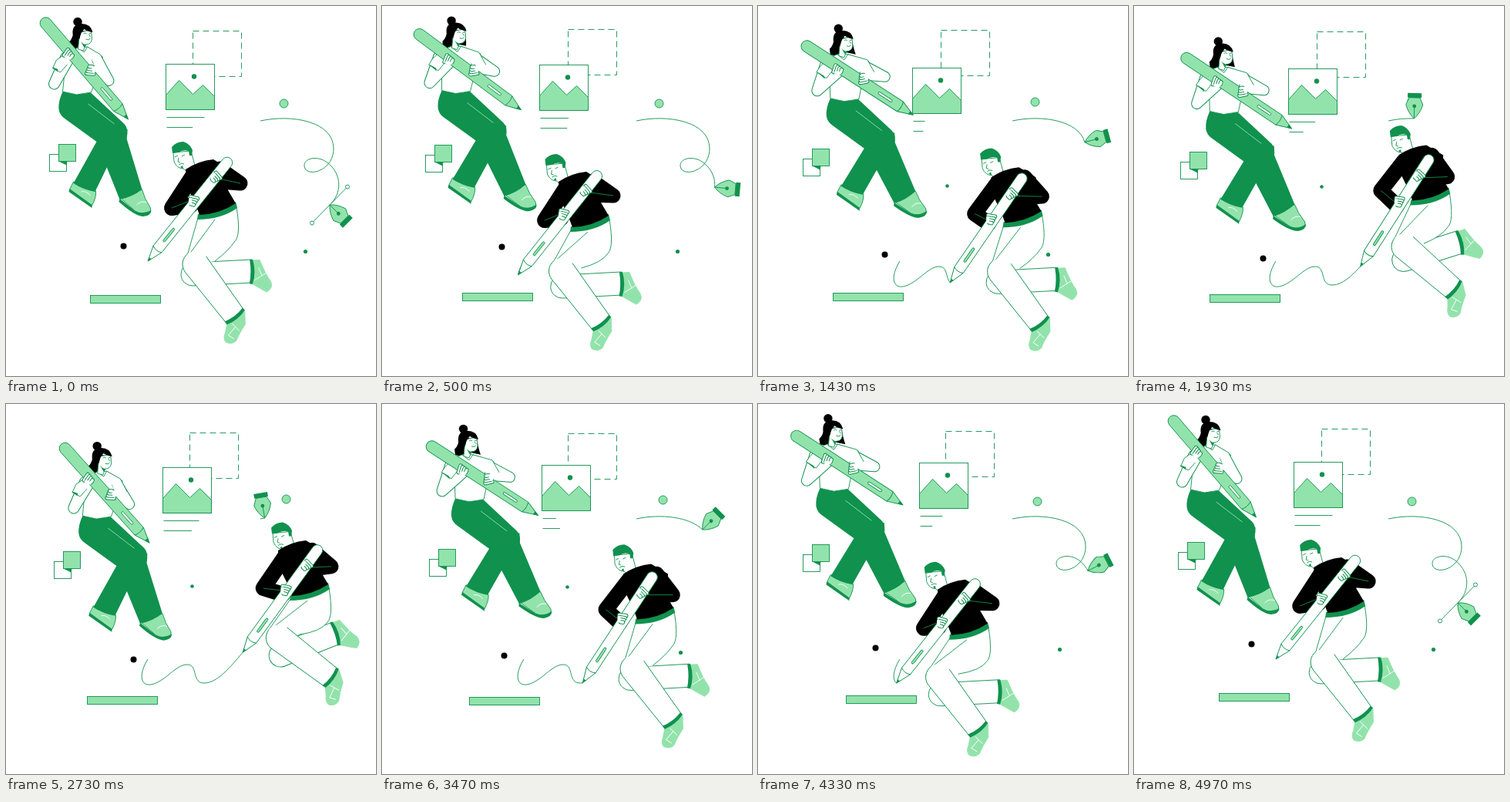
An HTML page with a canvas that plays this animation: 480x480 px, repeating every 5 s.

```html
<!DOCTYPE html>
<html lang="en">
<head>
<meta charset="utf-8">
<title>Design team</title>
<style>
html, body { margin: 0; height: 100%; overflow: hidden; background: #fff; }
canvas { display: block; }
</style>
</head>
<body>
<canvas id="stage" width="480" height="480"></canvas>
<script>
const c = document.getElementById('stage').getContext('2d');
const DARK = '#10914e', LIGHT = '#92e3ab', WHITE = '#fff', BLACK = '#000';
const LOOP = 5000, HALF = LOOP / 2;
const { PI, cos, sin, exp, abs, round } = Math;

const clamp = v => Math.max(0, Math.min(1, v));
const smooth = v => { v = clamp(v); return v * v * (3 - 2 * v); };

function draw(d, fill, edge) {
  const p = new Path2D(d);
  if (fill) { c.fillStyle = fill; c.fill(p); }
  if (edge) { c.strokeStyle = edge; c.stroke(p); }
}

function group(x, y, deg, paint) {
  c.save();
  c.translate(x, y);
  c.rotate(deg * PI / 180);
  paint();
  c.restore();
}

function dot(x, y, r, fill, edge) {
  c.beginPath();
  c.arc(x, y, r, 0, 7);
  c.fillStyle = fill;
  c.fill();
  if (edge) { c.strokeStyle = edge; c.stroke(); }
}

function box(x, y, w, h, fill, edge) {
  c.fillStyle = fill;
  c.fillRect(x, y, w, h);
  c.strokeStyle = edge;
  c.strokeRect(x, y, w, h);
}

function limb(points, width, fill, edge) {
  c.save();
  c.lineCap = c.lineJoin = 'round';
  const p = new Path2D('M' + points.join('L'));
  if (edge) { c.lineWidth = width + 1; c.strokeStyle = edge; c.stroke(p); }
  c.lineWidth = width - 1;
  c.strokeStyle = fill;
  c.stroke(p);
  c.restore();
}

function hand(x, y, deg) {
  group(x, y, deg, () => {
    for (let i = 0; i < 4; i++) limb([[-4 + i, i * 3 - 5], [5 - i, i * 3 - 5]], 4.5, WHITE, DARK);
    limb([[-4, -2], [-3, 3]], 5, WHITE);
  });
}

// A curve that can be drawn partway and followed
function curve(d) {
  const el = document.createElementNS('http://www.w3.org/2000/svg', 'path');
  el.setAttribute('d', d);
  const total = el.getTotalLength();
  return {
    at(part) {
      const p = el.getPointAtLength(total * clamp(part));
      return [p.x, p.y];
    },
    heading(part) {
      const [ax, ay] = this.at(part - .01), [bx, by] = this.at(part + .01);
      return Math.atan2(by - ay, bx - ax) * 180 / PI;
    },
    trace(part) {
      c.setLineDash([total * part, total]);
      if (part > .001) draw(d, null, DARK);
      c.setLineDash([]);
    }
  };
}
const wave = curve('M184 331C172 350 174 366 188 364C206 361 220 338 235 338C250 338 240 363 258 362C278 361 297 333 317 311');
const curl = curve('M330 149C372 140 425 150 425 185C425 212 395 222 388 211C382 198 404 192 418 204C436 219 436 243 420 258');

function props(turn) {
  // Slow elliptic float: centre, reach and phase for each axis
  const float = (x, rx, px, y, ry, py) =>
    [round(x + rx * cos(turn + px)) + .5, round(y + ry * cos(turn + py)) + .5];

  c.setLineDash([8, 5]);
  box(...float(240, 3.2, .7, 34, 4, -4.2), 63, 59, WHITE, DARK);
  c.setLineDash([]);

  const [x, y] = float(204.5, 4.5, 1, 78.5, 3.4, 3.3);
  box(x, y, 63, 59, WHITE, DARK);
  group(x, y, 0, () => {
    draw('M0 40L17 21L35 39L48 27L63 42V59H0Z', LIGHT, DARK);
    dot(36.5, 16, 3.2, DARK);
    draw(`M1 69h${31 + 18 * cos(2 * turn)}M1 82h${24.5 + 12 * cos(2 * turn - .7)}`, null, DARK);
  });

  const [sx, sy] = float(71, 3, -3.7, 185, 6, -3.3);
  box(sx - 12, sy + 13, 22, 22, WHITE, DARK);
  draw(`M${sx} ${sy + 22}h11l-1 5Z`, DARK);
  box(sx, sy, 22, 22, LIGHT, DARK);

  box(...float(106, 9, -5.1, 376, 4.5, -4.4), 91, 10, LIGHT, DARK);
  dot(...float(159, 8, -2.7, 321, 10, -3.3), 4, BLACK);
  dot(...float(243, 3, -1, 235, 2, -4.5), 2.3, DARK);
  dot(...float(383, 8, -5.4, 321, 3.5, -3), 2.6, DARK);
  dot(...float(361, 2.7, -4.3, 124.5, 1.5, 0), 5.5, LIGHT, DARK);
}

function nib(phase, ease) {
  const part = 1 - ease, tip = curl.at(part);
  curl.trace(part);
  const grow = clamp((.16 - phase) * 10);
  if (grow) {
    const dx = 23 * grow, dy = 23.5 * grow;
    draw(`M${420 - dx} ${258 + dy}L${420 + dx} ${258 - dy}`, null, DARK);
    for (const s of [-1, 1]) dot(420 + s * dx, 258 - s * dy, 2.5, WHITE, DARK);
  }
  group(...tip, curl.heading(part) - 90, () => {
    draw('M0 0Q7 -8 18 -11L27 -7V7L18 11Q7 8 0 0Z', LIGHT, DARK);
    draw('M0 0H15', null, DARK);
    dot(16, 0, 2.4, DARK);
    draw('M27 -9H33V9H27Z', DARK);
  });
}

function woman(turn) {
  const x = 88.8 - 13 * cos(turn) - 2.3 * cos(2 * turn);
  const y = 122 - 18 * cos(turn) + 7 * cos(2 * turn);
  const k = smooth(2 * sin(turn) ** 2);          // 0 upright, 1 leaning back
  const pt = (ax, ay, bx, by) => [ax + (bx - ax) * k, ay + (by - ay) * k];

  group(x - 74, y - 111, 0, () => {
    // legs
    group(0, -5 * k, 0, () => {
      draw('M88 228L117 240Q118 248 112 259L83 238Z', LIGHT, DARK);
      draw('M83 237L112 258V262L82 241Z', DARK);
      draw('M98 241Q104 239 110 246', null, WHITE);
    });
    draw(`M74 111Q68 124 69 134Q70 142 78 147L118 176L88 ${230 - 5 * k}Q100 ${238 - 5 * k} 116 ${241 - 5 * k}L133 206L157 172Q160 159 154 153L110 112Q92 117 74 111Z`, DARK);
    group(146, 165 - 3 * k, -6 * k, () => {
      c.translate(-146, -165);
      draw('M149 249L177 238Q180 250 188 262V267Q177 272 168 266Z', LIGHT, DARK);
      draw('M148 250L168 266Q178 271 189 265Q189 272 178 273Q167 272 147 254Z', DARK);
      draw('M170 258Q176 252 183 255', null, WHITE);
      draw('M118 176L148 251Q164 248 177 238L157 172L158 160L140 158Z', DARK);
    });
    draw('M107 127L141 153', null, LIGHT);

    // torso and head
    const shift = -9 * k;
    group(shift, 0, 0, () => {
      draw(`M88 30Q88 42 82 47L${pt(78, 56, 83, 54)}Q92 58 97 50L${pt(100, 50, 116, 54)}Q113 46 111 34Z`, BLACK);
    });
    const leftNeck = pt(94, 54, 83, 54), rightNeck = pt(106, 53, 97, 54);
    draw('M' + [leftNeck, pt(82, 60, 68, 60), pt(77, 82, 73, 82), [74, 111], [92, 115], [111, 112],
      pt(120, 88, 116, 88), pt(126, 66, 124, 63), rightNeck].join('L') + 'Z', WHITE, DARK);
    draw(`M${leftNeck}L${pt(102, 60, 92, 61)}L${rightNeck}`, null, DARK);
    group(shift, 0, 0, () => {
      draw('M97 34L95 45L94 56L101 58L104 50Q111 50 112 43L111 31Z', WHITE, DARK);
      draw('M97 45Q100 50 105 50L102 54Z', DARK);
      draw('M87 36Q86 23 99 23Q110 23 113 34Q106 33 102 30Q98 33 96 42L90 46Z', BLACK);
      dot(93.5, 20.5, 5.7, BLACK);
      draw('M101 36Q103 34 105 36M108 36L111 35M104 43Q108 45 110 42M108 37L110 40', null, DARK);
    });

    // arms and pencil
    limb([pt(78, 67, 68, 67), pt(63, 101, 57, 101), pt(81, 70, 84, 77)], 14, WHITE, DARK);
    limb([pt(119, 70, 117, 68), pt(134, 97, 145, 83), pt(113, 84, 118, 81)], 13, WHITE, DARK);
    draw('M' + [pt(84, 58, 72, 57), pt(66, 70, 60, 71), pt(61, 81, 56, 77), pt(71, 86, 69, 85), pt(80, 76, 76, 76)].join('L'), WHITE, DARK);
    draw('M' + [pt(60, 79, 56, 76), pt(68, 82, 66, 82), pt(67, 85, 67, 86)].join('L') + 'Z', DARK);
    draw('M' + [rightNeck, pt(123, 63, 122, 61), pt(132, 80, 131, 77), pt(118, 85, 117, 82)].join('L'), WHITE);
    draw('M' + [rightNeck, pt(123, 63, 122, 61), pt(132, 80, 131, 77)].join('L'), null, DARK);
    group(105.5 + 7 * k, 84.5 + 3.5 * k, 49.4 - 16.5 * k, () => {
      draw('M-82 -7.5H62L82 0L62 7.5H-82A7.5 7.5 0 0 1 -82 -7.5Z', LIGHT, DARK);
      draw('M62 -7.5Q65 0 62 7.5', null, DARK);
      draw('M76 -2.5L83 0L76 2.5Z', DARK);
      draw('M30 -1.5H48A1.5 1.5 0 0 1 48 1.5H30A1.5 1.5 0 0 1 30 -1.5Z', WHITE, DARK);
      hand(-31, 4, -105);
      hand(2, -5, 135);
    });
  });
}

function man(phase, ease) {
  const part = .95 * ease;
  wave.trace(part);
  const [tx, ty] = wave.at(part);
  const bend = exp(-(((phase - .7) / .17) ** 2));   // elbows lift late in the stroke
  const fold = smooth((phase - .6) / .25);          // legs swing up near the end
  const kick = cos(10 * phase);
  const ox = -64 + 6 * phase - 8 * sin(PI * phase), oy = 55 + 22 * bend + 9 * phase;
  const pen = 38.8 - 6 * bend - 1.5 * phase;
  const shin = 52.8 - 15.5 * fold, calf = -3 - 19 * fold;
  const knee = [241 + 6 * kick, 329 + 5 * kick];
  const mix = (ax, ay, bx, by) => [ax + (bx - ax) * bend, ay + (by - ay) * bend];
  const a = pen * PI / 180, b = shin * PI / 180;
  const onPen = d => [249 + ox + d * sin(a), 275 + oy - d * cos(a)];

  group(tx - ox - 249, ty - oy - 275, 0, () => {
    // back leg
    group(240 + 3 * kick, 347, calf, () => {
      draw('M78 -14L88 -14Q94 4 101 15Q104 23 95 28Q88 24 76 16Z', LIGHT, LIGHT);
      draw('M80 12L96 3M90 7L86 -4', null, WHITE);
      draw('M0 -15H78L75 15H0A15 15 0 0 1 0 -15Z', WHITE, DARK);
      draw('M75 -15H79Q83 2 77 17L73 16Q77 2 75 -15Z', DARK);
    });
    // thighs
    const top = [knee[0] - 17 * cos(b), knee[1] - 17 * sin(b)];
    const inner = [knee[0] + 25, knee[1] - 4];
    const seat = `300 260Q306 296 298 304Q290 316 ${inner}`;
    draw(`M${top}L250 274L${seat}L${knee}Z`, WHITE);
    draw(`M250 274L${top}M${seat}`, null, DARK);
    draw(`M272 276L${[top[0] + 4, top[1] - 2]}`, null, DARK);
    // front shin
    group(...knee, shin, () => {
      draw('M86 14L87 -14L101 -4Q106 10 111 18Q112 26 104 30Q98 30 94 23Z', LIGHT, LIGHT);
      draw('M90 9L103 7M96 8L99 22L107 19', null, WHITE);
      draw('M85 -14L0 -17A17 17 0 0 0 0 17L85 14.5Z', WHITE);
      draw('M85 -14L0 -17M85 14.5L0 17A17 17 0 0 1 -17 0', null, DARK);
      draw('M82 -14L86 -15Q91 0 87 15L82 15Q86 0 82 -14Z', DARK);
    });

    // head
    group(11 * phase * phase, -3 * bend, 0, () => {
      draw('M218 189L219 201Q223 210 231 210L236 214L246 206L241 187Z', WHITE, DARK);
      draw('M217 190L216 182Q222 175 231 175Q240 178 243 186L242 193L239 193L238 187Q230 185 225 189Z', DARK);
      draw('M220 195L224 193M229 194L233 192M225 196L224 201L227 202M225 205Q229 202 232 204', null, DARK);
      draw('M227 208L230 206L231 210Z', DARK);
    });

    // sweater
    draw('M250 269Q276 268 299 253L301 261Q280 276 249 276Z', DARK);
    draw('M234 211Q250 200 270 198L292 211L289 238L299 255Q278 269 252 270L246 254L236 234Z', BLACK);
    const leftElbow = mix(216, 261, 210, 256), rightElbow = mix(305, 229, 296, 241);
    const low = onPen(97), high = onPen(139);
    limb([mix(244, 218, 240, 219), leftElbow, [low[0] - 5, low[1] + 3]], 21, BLACK);
    limb([mix(278, 210, 277, 211), rightElbow, [high[0] + 3, high[1] + 5]], 20, BLACK);
    draw(`M${leftElbow}L${[low[0] - 8, low[1] - 2]}M${rightElbow}L${[high[0] + 8, high[1] + 2]}`, null, DARK);

    // pen
    group(249 + ox, 275 + oy, pen - 90, () => {
      draw('M0 0L20 -7H164A7 7 0 0 1 164 7H20Z', WHITE, DARK);
      draw('M20 -7Q16 0 20 7', null, DARK);
      draw('M0 0L5 -1.8V1.8Z', DARK);
      draw('M34 -1.5H53A1.5 1.5 0 0 1 53 1.5H34A1.5 1.5 0 0 1 34 -1.5Z', LIGHT, DARK);
      hand(97, -3, 65);
      hand(139, 0, 100);
    });
  });
}

const start = performance.now();
function paint() {
  const t = (performance.now() - start) % LOOP;
  const turn = 2 * PI * t / LOOP;
  const phase = 1 - abs(t / HALF - 1);           // there and back
  const ease = (1 - cos(PI * phase)) / 2;
  c.fillStyle = WHITE;
  c.fillRect(0, 0, 480, 480);
  c.lineWidth = .9;
  props(turn);
  woman(turn);
  man(phase, ease);
  nib(phase, ease);
  requestAnimationFrame(paint);
}
paint();
</script>
</body>
</html>
```
